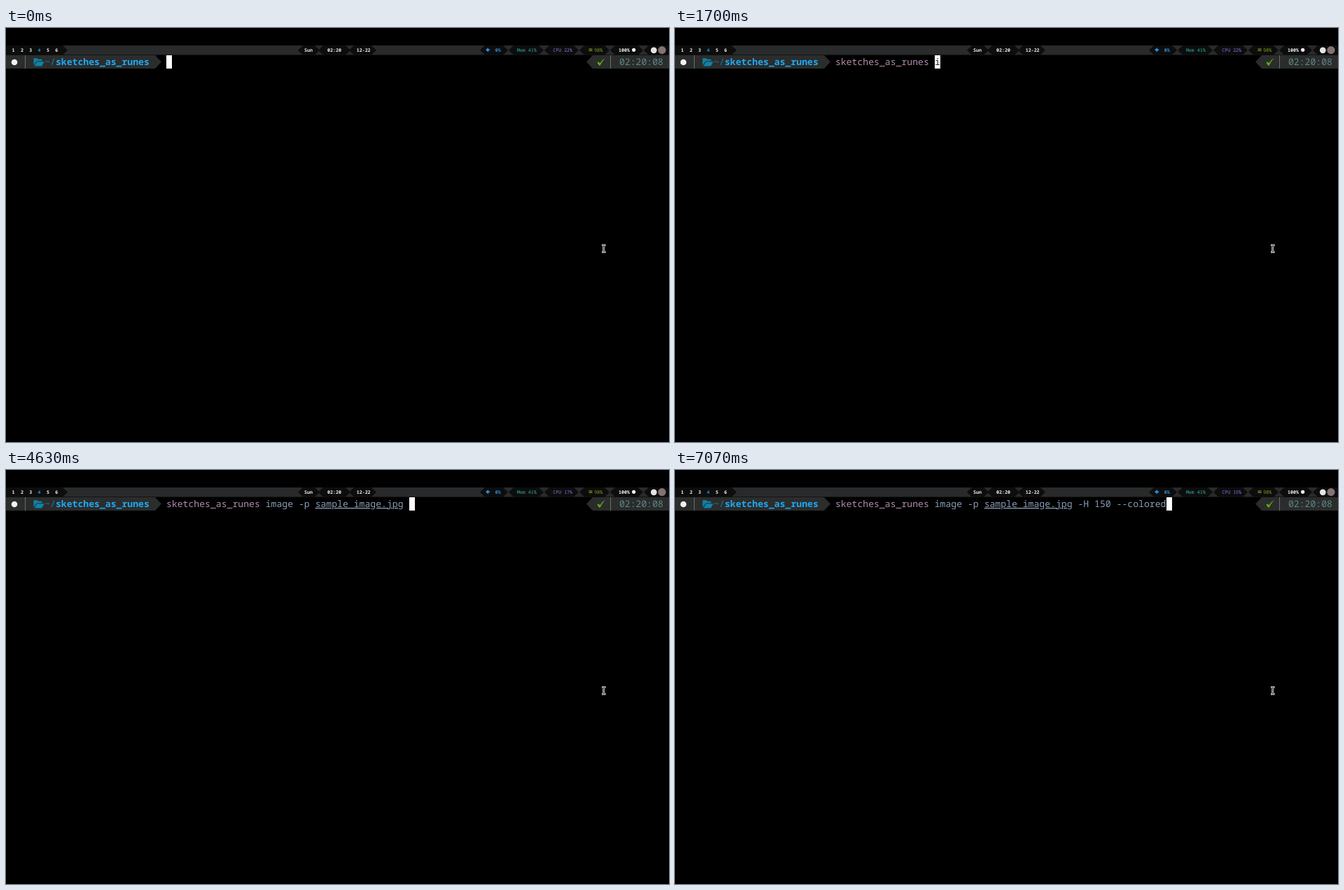
Recreate the animation shown at these times as an HTML page. Size 947 by 592 pixels, loop 8000 ms.

```html
<!DOCTYPE html>
<html lang="en">
<head>
<meta charset="utf-8">
<title>Terminal typing</title>
<style>
  html, body { margin: 0; width: 100%; height: 100%; overflow: hidden; background: #000; }
  svg { display: block; width: 100%; height: 100%; }
  text {
    font-family: "Noto Sans Mono", "DejaVu Sans Mono", monospace;
    text-rendering: geometricPrecision;
    white-space: pre;
  }
  .term { font-size: 13.14px; }
  .bar text { font-size: 6.6px; font-weight: 700; fill: #f2f2f2; text-anchor: middle; }
  .bar .thin { font-weight: 500; }
  .path { text-decoration: underline 1px; text-decoration-skip-ink: none; text-underline-offset: 1px; }
</style>
</head>
<body>
<svg viewBox="0 0 947 592">
  <g class="bar">
    <path fill="#282a2b" d="M0 25H947V38.5H0z"/>
    <path id="modules" fill="#0d0d0d"/>
    <g id="labels"></g>
    <path fill="#2c8fe0" d="M685 31.3l4-3.2v2.2h2v2h-2v2.2z"/>
    <path fill="#7d9d1c" d="M832.5 29.4h5v1.3h-5zM832.5 31.8h5v1.3h-5z"/>
    <circle cx="896.7" cy="31.3" r="2.6" fill="#f2f2f2"/>
    <circle cx="925.3" cy="31.8" r="4.4" fill="#e4e4e4"/>
    <circle cx="937" cy="31.6" r="5.6" fill="#857272"/>
  </g>

  <g fill="#2b2c2c">
    <path d="M0 39H213L222 48.5 213 58H0z"/>
    <path d="M947 39H838L829 48.5 838 58H947z"/>
  </g>
  <path stroke="#68726a" d="M27.5 39V58M863.5 39V58"/>
  <circle cx="12" cy="49" r="4.3" fill="#f2f2f2"/>
  <path fill="#0f83a8" d="M39.5 53.5V43.2h5l1.5 1.6h5.4v2.4h-7.6zM40.6 54.4l3.6-6.2h10.4l-3.4 6.2z"/>
  <path fill="#5faf0a" d="M844.4 49.6l2.3-1.4 1.6 2.2Q851 45.6 855.8 43 851.4 47.6 848.7 53.6h-1.6z"/>
  <g class="term">
    <text x="55.2" y="53" fill="#0f83a8">~/</text>
    <text x="71" y="53" fill="#1ea9f2" font-weight="700">sketches_as_runes</text>
    <text x="876" y="53" fill="#5f8787">02:20:08</text>
  </g>

  <rect id="caret" y="39" width="8" height="19" fill="#fff"/>
  <text class="term" x="229" y="53" fill="#8a9db4"><tspan id="name"></tspan><tspan id="args"></tspan><tspan id="file" class="path"></tspan><tspan id="rest"></tspan></text>
  <text class="term" id="under" y="53" fill="#222"></text>

  <g fill="none">
    <path id="beam" stroke="#e0e0e0" stroke-width="2.4" d="M851 310.8h1.7l1 .8 1-.8h1.7M853.7 311.5v8M851 320.2h1.7l1-.8 1 .8h1.7"/>
    <use href="#beam" style="stroke:#000;stroke-width:.8"/>
    <path stroke="#000" stroke-width=".8" d="M851.3 310.8h1.4l1 .8 1-.8h1.4M853.7 311.5v8M851.3 320.2h1.4l1-.8 1 .8h1.4"/>
  </g>
</svg>
<script>
  const LOOP = 8000, START_X = 229, CELL = 7.884;
  const COMMAND = "sketches_as_runes image -p sample_image.jpg -H 150 --colored";
  const NAME_END = 17, FILE_START = 27, FILE_END = 43;
  // [time, caret column]
  const KEYS = [[60, 0], [630, 8], [1700, 18], [2230, 23], [2500, 24], [3300, 29],
    [3570, 34], [3769, 34], [3770, 44], [4930, 44], [5530, 46], [6800, 60]];
  const CPU = [[0, 22], [2000, 16], [4000, 17], [6000, 15]];
  const byId = id => document.getElementById(id);

  // Pointed status modules as [left, right]
  const MODULES = [[417, 448], [446, 492], [490, 529], [677, 717], [718, 768],
    [769, 818], [819, 862], [863, 910]];
  byId("modules").setAttribute("d", "M0 25H81L88 31.7 81 38.5H0z" +
    "M918 25H947V38.5H918L911 31.7z" + MODULES.map(([a, b]) =>
      `M${a} 31.7L${a + 7} 25H${b - 7}L${b} 31.7 ${b - 7} 38.5H${a + 7}z`).join(""));

  function label(x, text, fill = "", thin = false) {
    const node = document.createElementNS("http://www.w3.org/2000/svg", "text");
    node.setAttribute("x", x);
    node.setAttribute("y", 33.6);
    if (thin) node.setAttribute("class", "thin");
    node.style.fill = fill;
    node.textContent = text;
    byId("labels").append(node);
    return node;
  }
  for (let i = 1; i <= 6; i++) label(10.5 + (i - 1) * 12.36, i, i === 4 ? "#2c8fe0" : "");
  label(432, "Sun");
  label(469, "02:20");
  label(510.7, "12-22");
  label(702.7, "0%", "#2c8fe0");
  label(743.8, "Mem 41%", "#32b3a2", true);
  const cpu = label(795.2, "", "#9270e6", true);
  label(846.3, "98%", "#86a81e", true);
  label(883, "100%");

  function caretAt(t) {
    const next = KEYS.findIndex(key => key[0] > t);
    if (next === 0) return 0;
    if (next < 0) return KEYS.at(-1)[1];
    const [t0, c0] = KEYS[next - 1], [t1, c1] = KEYS[next];
    return Math.floor(c0 + (c1 - c0) * (t - t0) / (t1 - t0) + 1e-6);
  }

  function draw(t) {
    const column = caretAt(t);
    const blank = t < 60 || (t >= 3770 && t < 4930);
    const shown = blank ? column : column + 1;
    const part = (from, to) => COMMAND.slice(from, Math.min(to, column));
    const x = START_X + column * CELL;

    byId("name").textContent = part(0, NAME_END);
    byId("name").setAttribute("fill", shown < NAME_END ? "#bf616a" : "#b08cab");
    byId("args").textContent = part(NAME_END, FILE_START);
    byId("file").textContent = part(FILE_START, FILE_END);
    byId("rest").textContent = part(FILE_END, COMMAND.length);
    byId("caret").setAttribute("x", Math.round(x));
    byId("under").setAttribute("x", x);
    byId("under").textContent = COMMAND.slice(column, shown);
    cpu.textContent = `CPU ${CPU.findLast(step => step[0] <= t)[1]}%`;
  }

  const origin = performance.now();
  function tick() {
    draw((performance.now() - origin) % LOOP);
    requestAnimationFrame(tick);
  }
  tick();
</script>
</body>
</html>
```
